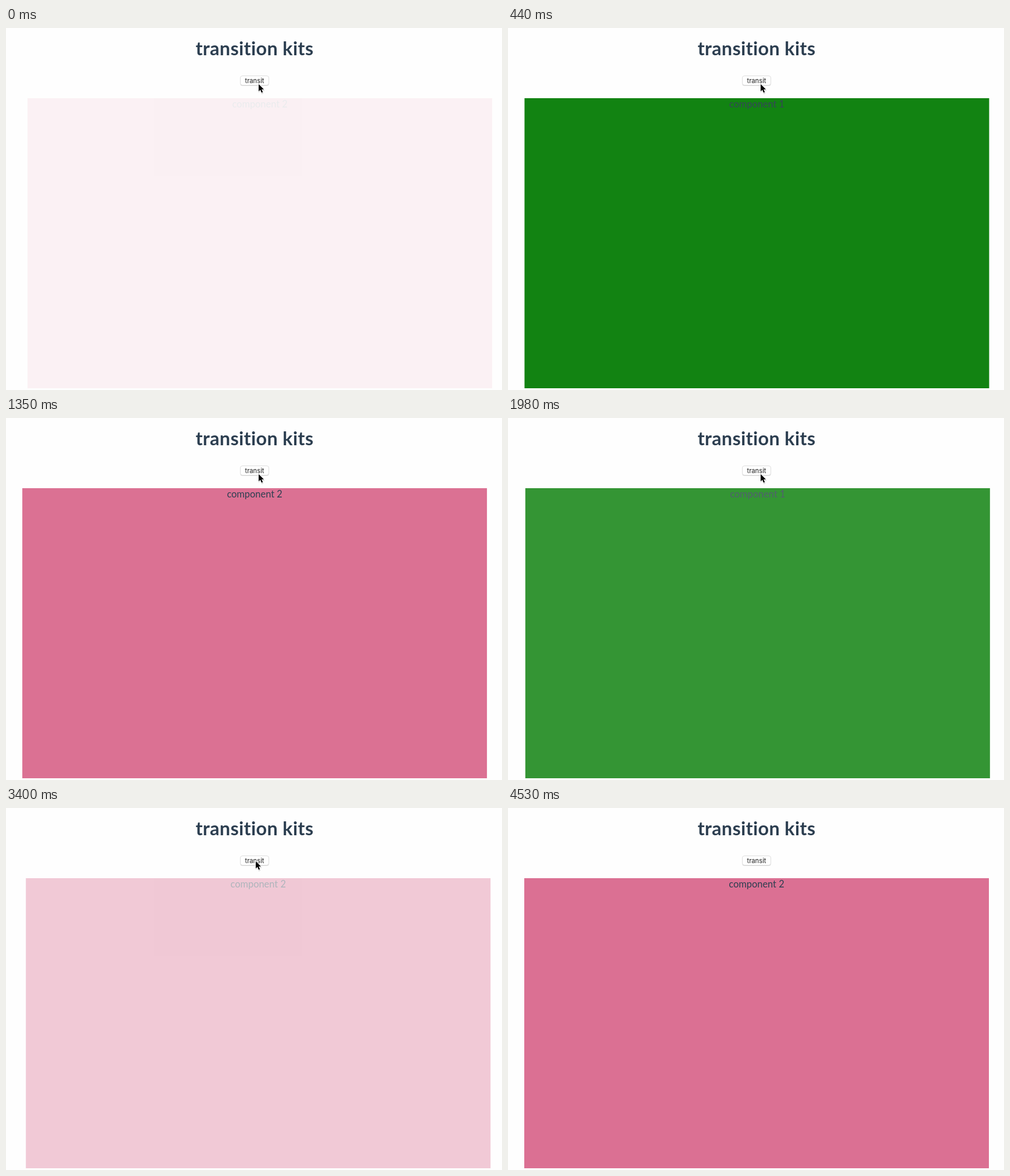
These frames come from a looping animation (854x624 px, 5050 ms). An HTML page:

```html
<!DOCTYPE html>
<html lang="en">
<head>
<meta charset="utf-8">
<title>transition kits</title>
<style>
  html, body { margin: 0; width: 100%; height: 100%; overflow: hidden; background: #fefefe; }
  svg { display: block; width: 854px; height: 624px; }
  text {
    text-anchor: middle; fill: #2c3e50;
    font-family: Lato, "Open Sans", sans-serif; font-variant-ligatures: none;
  }
  .title { font-size: 32.4px; font-weight: 700; letter-spacing: .35px; }
  .label { font-size: 16.4px; }
  .button { font: 11.2px Inter, Roboto, sans-serif; fill: #222; }
</style>
</head>
<body>
<svg viewBox="0 0 854 624">
  <rect width="854" height="624" fill="#fefefe"/>
  <text class="title" x="428" y="46.5">transition kits</text>
  <rect x="403.5" y="83" width="49" height="16.5" rx="3.5" fill="#c4c4c4"/>
  <rect x="403.5" y="82.5" width="49" height="16" rx="3.5" fill="#fff" stroke="#dedede"/>
  <text class="button" x="428" y="94.7">transit</text>
  <g id="panel">
    <rect id="box" x="28" y="121" width="800" height="500"/>
    <text id="label" class="label" x="428" y="137"></text>
  </g>
  <g id="cursor">
    <path d="M.5 2V16L4 13.5L6.2 18.5L9.2 17.3L7.2 12.5H11.5Z" fill="#000" opacity=".18"/>
    <path d="M1 1.2V13.8L3.9 11.1L6 16L8.2 15.1L6.1 10.3H10Z"
          fill="#000" stroke="#fff" stroke-width="1.6" paint-order="stroke"/>
  </g>
</svg>
<script>
const LOOP = 5050, ENTER = 500, STEP = 120, SHIFT = 10;
const PINK = { color: "#db7093", label: "component 2" };
const GREEN = { color: "#087e08", label: "component 1" };

// at: first refresh that shows the panel; lead: how far its entrance has run by then
const scenes = [
  { at: 0, lead: 48, look: PINK },
  { at: 120, lead: 130, look: GREEN },
  { at: 940, lead: 78, look: PINK },
  { at: 1740, lead: 18, look: GREEN },
  { at: 3400, lead: 118, look: PINK }
];

const [panel, box, label, cursor] =
  ["panel", "box", "label", "cursor"].map(id => document.getElementById(id));

const progress = (t, from, to) => Math.min(1, Math.max(0, (t - from) / (to - from)));
const bezier = (a, b, u) => 3 * a * u * (1 - u) ** 2 + 3 * b * u * u * (1 - u) + u ** 3;

// The CSS "ease" curve
function ease(x) {
  let low = 0, high = 1;
  for (let i = 0; i < 24; i++) {
    const mid = (low + high) / 2;
    if (bezier(.25, .25, mid) < x) low = mid; else high = mid;
  }
  return bezier(.1, 1, high);
}

function drawPanel(t) {
  const { at, lead, look } = scenes.findLast(scene => scene.at <= t);
  const elapsed = lead + Math.floor((t - at) / STEP) * STEP;
  const shown = ease(progress(elapsed, 0, ENTER));

  box.setAttribute("fill", look.color);
  label.textContent = look.label;
  panel.setAttribute("opacity", shown);
  panel.setAttribute("transform", `translate(${SHIFT * (1 - shown)} 0)`);
}

function drawCursor(t) {
  const sway = Math.sin(Math.PI * progress(t, 2200, 2770));
  const nudge = progress(t, 2770, 2950);
  const leave = progress(t, 3480, 3920);
  const drop = progress(t, 3920, 4530);
  const x = 434 + 322 * sway - 5 * nudge + 411 * leave + 6 * drop;
  const y = 95.5 + 208 * sway - 5 * nudge + 400 * leave + 135 * drop;
  cursor.setAttribute("transform", `translate(${x} ${y})`);
}

const origin = performance.now();
function frame() {
  const t = (performance.now() - origin) % LOOP;
  drawPanel(t);
  drawCursor(t);
  requestAnimationFrame(frame);
}
frame();
</script>
</body>
</html>
```
